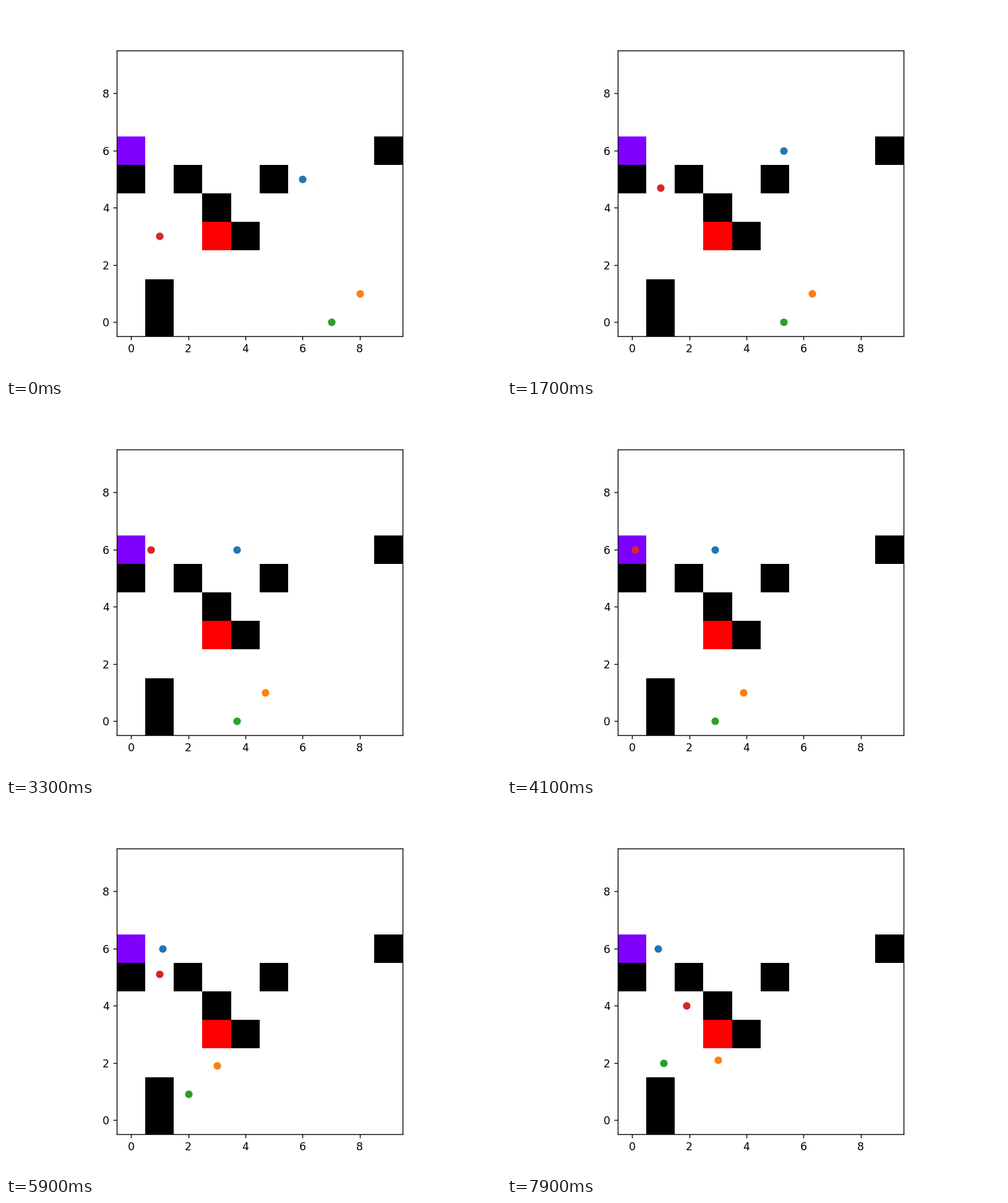
Write a matplotlib script that moves like this. It is 800x600 px and loops after 8 s.

```python
import numpy as np
import matplotlib.pyplot as plt
from matplotlib.animation import FuncAnimation

SIZE = 10
SUBSTEPS = 10  # frames per move between neighbouring cells

WALLS = [(1, 0), (1, 1), (4, 3), (3, 4), (0, 5), (2, 5), (5, 5), (9, 6)]
PURPLE_CELL, RED_CELL = (0, 6), (3, 3)

# Start cell and moves of each agent
ROUTES = [
    ((6, 5), "ULLLLLLR"),
    ((8, 1), "LLLLLUUD"),
    ((7, 0), "LLLLLUUL"),
    ((1, 3), "UUULRDDR"),
]
MOVES = {"U": (0, 1), "D": (0, -1), "L": (-1, 0), "R": (1, 0)}


def make_grid():
    grid = np.full((SIZE, SIZE, 3), 255, dtype=np.uint8)
    for x, y in WALLS:
        grid[y, x] = 0
    for (x, y), color in ((PURPLE_CELL, (127, 0, 255)), (RED_CELL, (255, 0, 0))):
        grid[y, x] = color
    return grid


def waypoints(start, moves):
    steps = [start] + [MOVES[m] for m in moves]
    return np.cumsum(steps, axis=0)


paths = [waypoints(*route) for route in ROUTES]

fig, ax = plt.subplots(figsize=(6.4, 4.8), dpi=125)
ax.imshow(make_grid(), origin="lower")
dots = [ax.plot(*path[0], "o")[0] for path in paths]
ax.set_xlim(-0.5, SIZE - 0.5)
ax.set_ylim(-0.5, SIZE - 0.5)
ax.set_xticks(range(0, SIZE, 2))
ax.set_yticks(range(0, SIZE, 2))


def update(frame):
    step, sub = divmod(frame, SUBSTEPS)
    t = sub / SUBSTEPS
    for dot, path in zip(dots, paths):
        x, y = path[step] + t * (path[step + 1] - path[step])
        dot.set_data([x], [y])
    return dots


anim = FuncAnimation(fig, update, frames=8 * SUBSTEPS, interval=100,
                     repeat=True, repeat_delay=0)
plt.show()
```
